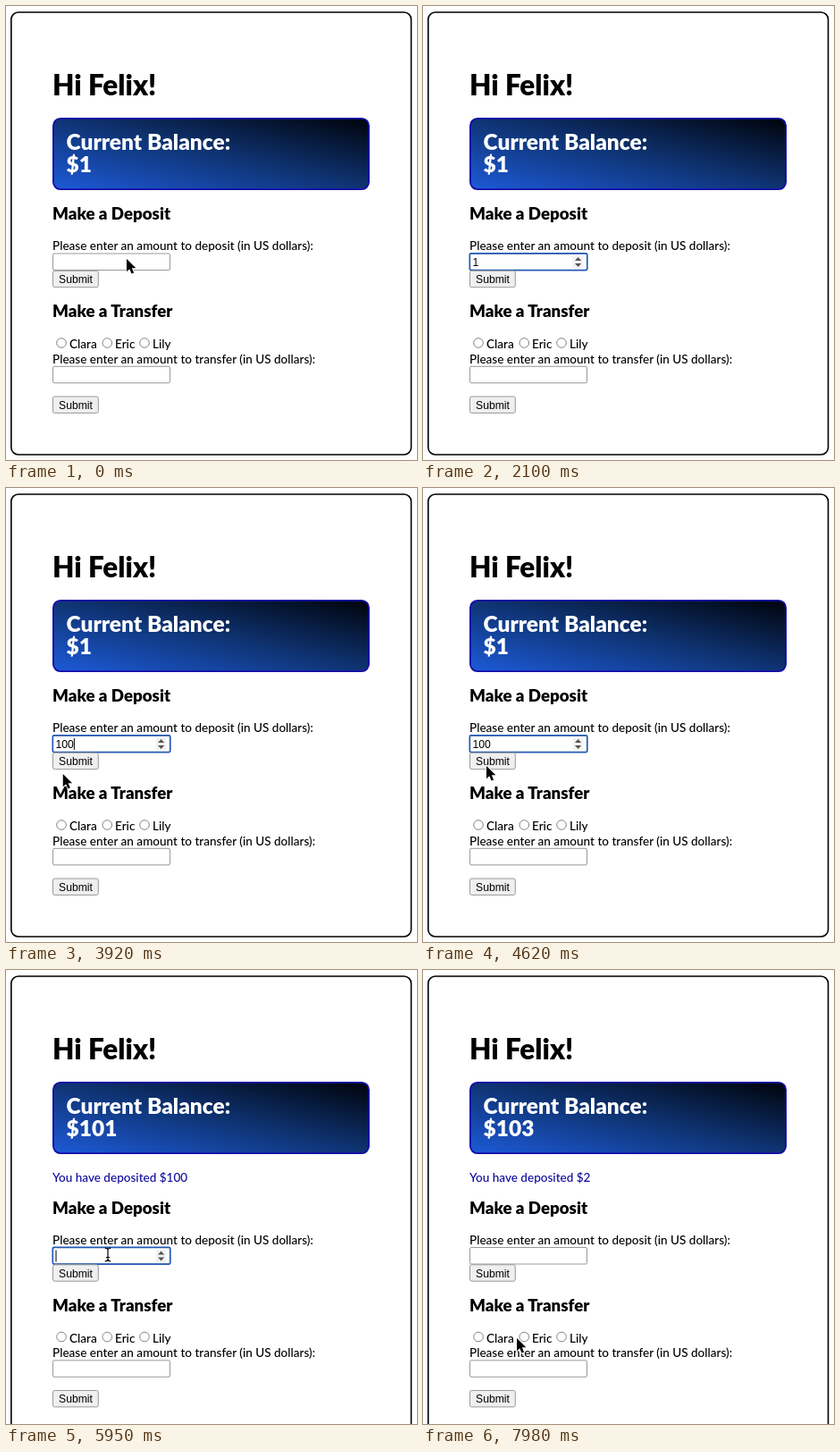
An HTML page that plays this animation: 460 px wide and 508 px high, repeating every 8000 ms.

```html
<!DOCTYPE html>
<html lang="en">
<head>
<meta charset="utf-8">
<title>Balance page</title>
<style>
  html, body { margin: 0; height: 100%; overflow: hidden; background: #fff; }
  svg { display: block; width: 460px; height: 508px; font: 500 13.55px Lato, sans-serif; }
  .h1, .h2, .h3 { font-weight: 900; }
  .h1 { font-size: 31.5px; }
  .h2 { font-size: 24.5px; fill: #fff; }
  .h3 { font-size: 18.7px; }
  .ui { font: 12.2px "Liberation Sans", Arial, sans-serif; }
  .field { fill: #fff; stroke: #999; }
  .button { fill: #efefef; stroke: #999; }
  .button.down { fill: #f6f6f6; stroke: #c8c8c8; }
</style>
</head>
<body>
<svg viewBox="0 0 460 508">
  <defs>
    <linearGradient id="blue" x1="0" y1="1" x2="1" y2="0">
      <stop stop-color="#1d5ad8"/>
      <stop offset=".5" stop-color="#0f3474"/>
      <stop offset="1" stop-color="#00030a"/>
    </linearGradient>
  </defs>
  <rect id="card" x="5.8" y="7" width="447.7" rx="8" fill="none" stroke="#000" stroke-width="1.6"/>
  <text class="h1" x="52" y="100">Hi Felix!</text>
  <rect x="52.9" y="125.9" width="353.2" height="79.2" rx="8" fill="url(#blue)" stroke="#150ca8" stroke-width="1.8"/>
  <text class="h2" x="67.5" y="161">Current Balance:</text>
  <text class="h2" x="67.5" y="186" id="balance"></text>
  <text x="52" y="236.5" fill="#0f0a9c" id="message"></text>

  <g id="form">
    <text class="h3" x="52" y="239">Make a Deposit</text>
    <text x="52" y="273">Please enter an amount to deposit (in US dollars):</text>
    <rect class="field" x="52.5" y="277" width="131" height="18.5" rx="1.5"/>
    <rect id="ring" x="52.3" y="276.9" width="131.5" height="18.7" rx="1.5" fill="none" stroke="#2459b4" stroke-width="1.7"/>
    <g id="spinner">
      <rect x="167.5" y="279.5" width="12" height="14" rx="1" fill="#f2f2f2"/>
      <path d="M170 285l3.6-4 3.6 4zM170 288l3.6 4 3.6-4z" fill="#555"/>
    </g>
    <text class="ui" x="55.5" y="290.5" id="amount"></text>
    <path id="caret" stroke="#000"/>
    <rect class="button" id="deposit" x="52.5" y="296.3" width="50.8" height="18.4" rx="2"/>
    <text class="ui" x="59" y="310">Submit</text>

    <text class="h3" x="52" y="348">Make a Transfer</text>
    <g fill="#fff" stroke="#858585">
      <circle cx="62" cy="377" r="5.3"/>
      <circle cx="113.3" cy="377" r="5.3"/>
      <circle cx="155" cy="377" r="5.3"/>
    </g>
    <text x="71" y="383">Clara</text>
    <text x="122" y="383">Eric</text>
    <text x="164" y="383">Lily</text>
    <text x="52" y="399.5">Please enter an amount to transfer (in US dollars):</text>
    <rect class="field" x="52.5" y="403.3" width="131" height="18.5" rx="1.5"/>
    <rect class="button" x="52.5" y="437" width="50.8" height="18.4" rx="2"/>
    <text class="ui" x="59" y="450.8">Submit</text>
  </g>

  <g id="pointer">
    <circle id="click" cx="-1" r="21.3" fill="#fff" fill-opacity=".25" stroke="#222" stroke-width="1.6"/>
    <path id="arrow" d="M0 0V14.3L3.3 11.2 5.6 16.6 8.1 15.5 5.8 10.2H10.3Z" stroke="#fff" stroke-width="1.6" paint-order="stroke"/>
    <path id="beam" d="M-3.2-7.3Q0-7.3 0-5V5Q0 7.3-3.2 7.3M3.2-7.3Q0-7.3 0-5M0 5Q0 7.3 3.2 7.3M-2 3H2" fill="none" stroke="#000" stroke-width="1.2"/>
  </g>
</svg>
<script>
const LOOP = 8000, STEP = 70, SHIFT = 33.5, HOLD = 140;
const el = id => document.getElementById(id);
const show = (id, on) => el(id).style.display = on ? "" : "none";

// pointer moves: start, end, x, y
const moves = [
  [0, 0, 135, 283], [70, 350, 134, 287], [840, 1050, 114, 285], [2870, 3150, 76, 302],
  [3850, 4130, 48, 343], [4270, 4550, 71, 311], [5180, 5390, 114, 318.5],
  [6370, 6440, 122, 344], [6650, 7070, 87, 335], [7490, 7770, 122, 425], [7770, 7980, 105, 412]
];
const keys = [[1540, "1"], [2730, "0"], [2870, "0"], [6300, "2"]];

// wake the window, focus, submit, focus, submit
const releases = [490, 1190, 4830, 5950, 7350];
const presses = releases.map(t => t - HOLD);
const submits = [releases[2], releases[4]];

const typed = (from, to) => keys.filter(([at]) => at >= from && at <= to).map(k => k[1]).join("");

function position(t) {
  let x = 0, y = 0;
  for (const [start, end, toX, toY] of moves) {
    if (t < start) break;
    const k = Math.min(1, (t - start) / (end - start || 1));
    const e = end === start ? 1 : 1 - (1 - k) ** 2;
    x += (toX - x) * e;
    y += (toY - y) * e;
  }
  return [x, y];
}

function draw(now) {
  const t = Math.floor(now % LOOP / STEP) * STEP;
  const last = list => Math.max(0, ...list.filter(at => at <= t));

  const sent = last(submits);
  const amounts = submits.filter(at => at <= t).map((at, i) => +typed(submits[i - 1] || 0, at));
  const shift = sent ? SHIFT : 0;
  el("balance").textContent = "$" + amounts.reduce((sum, n) => sum + n, 1);
  el("message").textContent = sent ? "You have deposited $" + amounts.at(-1) : "";
  el("amount").textContent = typed(sent, t);
  el("form").setAttribute("transform", `translate(0 ${shift})`);
  el("card").setAttribute("height", 495 + shift);

  // an odd press focuses the field, the next one leaves it
  const pressed = presses.filter(at => at <= t).length;
  const focus = pressed > 0 && pressed % 2 === 0;
  const lastKey = last(keys.map(k => k[0]));
  const idle = t - Math.max(lastKey, last(presses));
  show("ring", focus);
  show("caret", focus && idle % 1050 < 560);
  el("caret").setAttribute("d", `M${56 + el("amount").getComputedTextLength()} 280v13`);

  const [x, y] = position(t);
  const top = 277 + shift;
  const hover = t >= releases[0] && x > 52 && x < 184 && y > top && y < top + 19;
  const hidden = lastKey > last(moves.map(m => m[0]));
  const down = presses.some(at => t >= at && t < at + HOLD);
  show("spinner", hover || focus);
  show("beam", hover && !hidden);
  show("arrow", !hover && !hidden);
  show("click", down);
  el("deposit").classList.toggle("down", down && pressed > 1 && !focus);
  el("pointer").setAttribute("transform", `translate(${x} ${y})`);
  requestAnimationFrame(draw);
}
requestAnimationFrame(draw);
</script>
</body>
</html>
```
